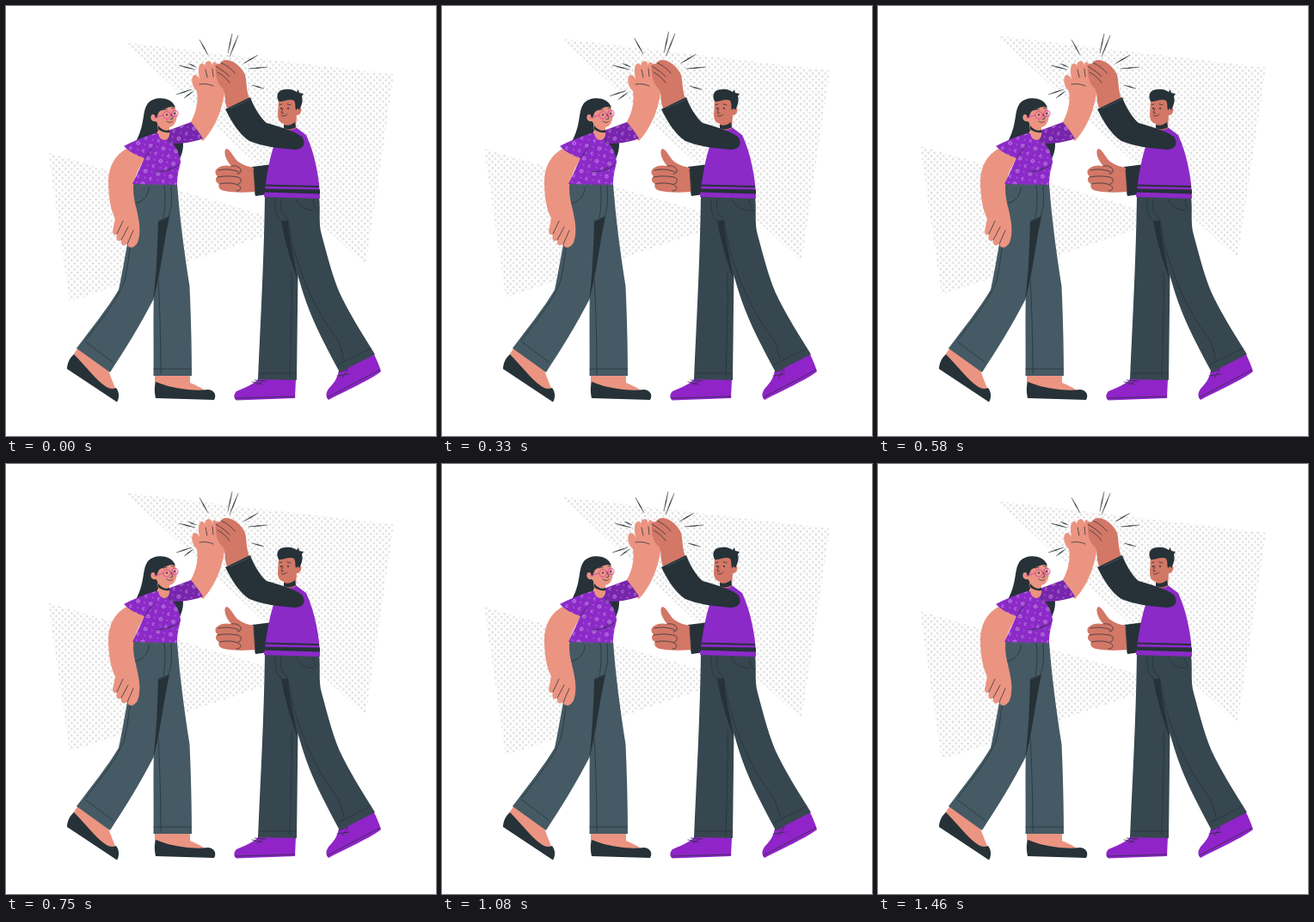
An HTML page for the animation above (1500 ms loop, 500 by 500 pixels).

```html
<!DOCTYPE html>
<html lang="en">
<head>
<meta charset="utf-8">
<title>High five</title>
<style>
  html, body { margin: 0; width: 100%; height: 100%; overflow: hidden; background: #fff; }
  svg { display: block; width: 100%; height: 100%; }
  .ink { fill: #263238; }
  .purple { fill: #8c2ac8; }
  .shade { fill: #7825ad; }
  .shoe { fill: #9024c8; }
  .skin { fill: #eb9481; }
  .tan { fill: #d37766; }
  .jeans { fill: #455a64; }
  .slacks { fill: #37474f; }
  .line { fill: none; stroke: #263238; stroke-width: .75; stroke-linecap: round; stroke-linejoin: round; }
  .pink { fill: none; stroke: #d63bb8; stroke-width: .85; }
</style>
</head>
<body>
<svg viewBox="0 0 500 500">
  <defs>
    <pattern id="dots" width="7.1" height="7.1" patternUnits="userSpaceOnUse">
      <g fill="#e0e0e0">
        <circle cx="1.775" cy="1.775" r="1.45"/>
        <circle cx="5.325" cy="5.325" r="1.45"/>
      </g>
    </pattern>
    <pattern id="print" width="15" height="15" patternUnits="userSpaceOnUse" patternTransform="rotate(12)">
      <g fill="none" stroke="#dfb5f3" stroke-width=".8">
        <circle cx="3.5" cy="4" r="1.7"/>
        <path d="M12.4 10.3A1.4 1.4 0 1 0 12.4 12.6"/>
        <path d="M10.5 3.5l1.2 .6M4 11l.8 1.2"/>
      </g>
    </pattern>
  </defs>

  <g id="backdrop" fill="url(#dots)">
    <path d="M139 43L451 80L418 302Z"/>
    <path d="M49 171L312 247V264L74 344Z"/>
  </g>

  <g id="sparks" class="ink"></g>

  <g id="woman">
    <path class="ink" d="M192 155L205 154C207 162 206 170 201 180Z"/>
    <path class="ink" d="M196 116C192 106 173 104 165 113C159 121 161 132 156 146C153 155 149 160 149 165C160 163 171 156 176 147L186 128Z"/>

    <path class="skin" d="M84 397L119 424L128 447L105 440L78 406Z"/>
    <path class="ink" d="M79 405C74 409 71 416 71 422L129 460.500C132 456 132 449 128 444C124 446 119 445 114 441C104 434 92 418 79 405Z"/>
    <path class="skin" d="M173 428H214V438C221 441 228 444 232 448L190 448L173 439Z"/>
    <path class="ink" d="M174 437C172 444 173 451 174 456L242 458C245 453 243 447 235 446C226 447 216 447 204 445C190 443 182 440 174 437Z"/>

    <path class="jeans" d="M165 207L199 207C202 246 207 284 213.500 326C215 360 216 397 216 430H171.500C172 400 171 365 172 330L177 248Z"/>
    <path class="jeans" d="M148 207H198L191 245C183 275 181 308 171 342C156 371 138 400 121 426L82 398C99 375 118 352 131 330C136 307 139 286 144 262C147 243 147 225 148 207Z"/>
    <path class="ink" d="M177 251L190 245C183 276 180 310 171 343C175 313 176 282 177 251Z"/>
    <path class="line" d="M92 390L124 414M93 388C112 363 130 342 138 319C143 299 143 281 147 265M172 422H215M177 318C179 352 180 390 180 428M166 211C166 221 159 228 149 230M184 209C186 222 185 236 183 246M192 209C193 224 193 235 189 244M177 250L190 245"/>

    <path class="skin" d="M140 166C127 173 119 187 119 204C119 222 122 238 127 247L124 262C124 266 127 267 129 265C127 272 130 275 134 272C133 279 138 280 141 276C142 284 150 281 153 275C156 267 156 257 154 247C152 234 148 226 148 211C149 198 155 187 162 177Z"/>
    <path class="line" d="M136 250L129 265M142 257L134 272M148 261L141 277"/>

    <path class="skin" d="M211 141C221 127 224 112 222 99C216 94 214 83 219 80C223 80 225 84 226 87C223 79 223 69 227 67C230 66 232 70 232 74C230 68 232 64 236 64C239 64 240 68 240 73C239 66 241 64 244 66C248 68 250 78 252 85C256 94 254 107 250 119C245 136 237 148 229 157Z"/>
    <path class="line" d="M225 91C231 90 237 91 241 93M232 74L234 83M240 73L241 82M246 72L247 80"/>

    <g id="shirt">
      <path class="purple" d="M174 148C163 151 148 157 137 163C144 170 152 174 161 177L147 207L199 208C199 195 202 188 203 181C202 172 198 164 192 157L192 145Z"/>
      <path class="shade" d="M188 145L215 135C220 141 225 147 229 154C217 159 203 160 191 160Z"/>
      <path fill="url(#print)" d="M174 148C163 151 148 157 137 163C144 170 152 174 161 177L147 207L199 208C199 195 202 188 203 181C202 172 198 164 194 159L229 154L215 135L190 145Z"/>
      <path class="line" d="M161 177C165 172 168 166 172 162M189 147C188 153 189 157 192 160M202 183C197 190 186 192 175 193M193 187L189 190"/>
    </g>

    <path class="skin" d="M176 136L190 136L190 145C191 152 188 156 184 156C179 155 177 151 177 147Z"/>
    <path class="ink" d="M177 139C181 144 186 146 190 144L190 147C184 148 179 145 177 143Z"/>
    <path class="skin" d="M174 121C181 119 188 116 194 115C199 121 200 129 197 135C194 143 183 143 178 138L174 134C170 135 167 131 169 127C170 125 173 126 174 128Z"/>
    <path class="ink" d="M173 128C172 118 178 114 185 112C190 111 195 113 197 118C190 116 187 119 182 121C177 122 177 125 175 131Z"/>
    <g class="pink">
      <circle cx="187" cy="127" r="4.300"/>
      <circle cx="196.500" cy="125" r="3.700"/>
      <path d="M183 127L172 130M191 126L193 126"/>
    </g>
    <path class="line" d="M183 121L187 120M193 119L196 119M192 126L194 131L191 132M187 134C190 136 192 136 194 134"/>
    <circle class="ink" cx="187" cy="126.500" r="1"/>
    <circle class="ink" cx="196" cy="125" r="1"/>
  </g>

  <g id="man">
    <path class="shoe" d="M268 448C277 444 288 440 293 434H337L336 456L268 458.500C264 456 265 451 268 448Z"/>
    <path class="shoe" d="M387 424L428 405C431 411 434 418 436 425C427 433 392 449 375 458C371 454 372 449 376 444C382 438 386 431 387 424Z"/>
    <path class="line" d="M267 456L336 454M374 455L435 423M286 437L298 440M289 435L303 436M292 441L299 436M385 430L399 428M387 426L398 422M391 432L397 424"/>

    <path class="slacks" d="M301 222H335L339.500 310L338 435L293 434C296 365 300 295 301 222Z"/>
    <path class="slacks" d="M315 222H364C366 237 363 252 367 266C374 292 381 320 391 340C402 362 416 384 429 405L388 426C373 398 358 370 349 344C345 333 342 322 339 312C334 292 325 268 320 248Z"/>
    <path class="ink" d="M320 250L328 249C329 272 336 295 339 318C331 297 324 273 320 250Z"/>
    <path class="line" d="M295 427H336M332 310C333 350 331 390 330 432M386 417L424 398M328 251C334 290 351 344 387 390L393 410M313 224C312 238 315 247 321 250M320 224C318 235 320 243 328 248M337 224C341 234 348 238 358 237M357 226C358 231 359 235 362 238"/>

    <path class="ink" d="M286 187L310 184L304 219L290 221Z"/>
    <path class="tan" d="M288 188L290 216C276 217 264 217 254 215C248 214 246 210 248 207C243 205 243 200 246 198C242 195 243 190 247 188C251 185 257 185 262 186C256 180 252 169 256 166C261 166 264 176 270 181C276 185 282 187 288 188Z"/>
    <path class="line" d="M262 186C267 185 271 187 273 190C274 193 272 195 269 195M247 191C255 189 264 190 271 193M246 199C255 197 264 198 270 199C275 201 274 206 270 207M248 207C256 205 265 206 270 208C275 211 273 215 268 215M288 190L290 219"/>

    <path class="purple" d="M325 140C318 147 313 157 310 167C305 184 302 204 300 222L365 224C365 202 359 171 349 150L337 141Z"/>
    <path class="ink" d="M302 207.500L364 209V211L301 209.500ZM301 212.500L365 213.500V218.500L300 216.500Z"/>

    <path class="tan" d="M257 119C253 109 256 101 252 96C245 91 243 77 244 69C247 66 249 68 250 66C252 62 257 62 262 64C269 67 275 73 278 80C280 88 279 97 283 108Z"/>
    <path class="line" d="M244 70C251 74 256 78 260 82M246 77C252 80 256 84 260 89M250 66C257 69 262 73 266 78"/>
    <path class="ink" d="M255 120L284 106C288 117 295 129 303 136C317 140 335 145 344 152C349 159 347 166 337 167C319 166 297 163 283 157C270 148 262 134 255 120Z"/>
    <path class="line" d="M261 119L285 108" style="stroke:#455a64"/>

    <path class="tan" d="M323 132L338 128L337 142C333 145 326 145 323 141Z"/>
    <path class="ink" d="M323 138C328 140 332 138 336 135L337 141C332 144 327 144 323 142Z"/>
    <path class="tan" d="M317 109L336 108L338 119C341 116 345 119 343 123C342 127 339 127 338 127C336 135 330 138 324 137C318 136 316 132 316 126Z"/>
    <path class="ink" d="M317 111C313 103 317 97 325 97C331 96 335 98 338 100L340 97L341 101L346 102L344 105C346 111 343 117 341 121C339 117 338 121 337 121C336 117 337 113 335 110C329 107 323 112 317 111Z"/>
    <path class="line" d="M318 115L321 114M327 114L331 115M322 119L320 124L323 125M320 127C322 129 325 128 327 126"/>
    <circle class="ink" cx="320" cy="119" r="1"/>
    <circle class="ink" cx="328" cy="119" r="1"/>
  </g>
</svg>
<script>
const LOOP = 1500;
const backdrop = document.getElementById('backdrop');
const sparks = document.getElementById('sparks');

// Each spark is a sliver from its outer tip to its inner tip.
const rays = [
  [225, 39, 235, 57], [263, 32, 258, 55], [270, 34, 260, 59],
  [293, 57, 276, 67], [304, 71, 282, 73], [300, 96, 286, 92],
  [201, 69, 220, 74], [212, 67, 221, 71], [198, 103, 216, 97], [207, 107, 218, 99]
];

function sliver([x1, y1, x2, y2]) {
  const length = Math.hypot(x2 - x1, y2 - y1);
  const dx = (y1 - y2) / length * .5, dy = (x2 - x1) / length * .5;
  const mx = (x1 + x2) / 2, my = (y1 + y2) / 2;
  return `M${x1} ${y1}L${mx + dx} ${my + dy}L${x2} ${y2}L${mx - dx} ${my - dy}Z`;
}

const ray = document.createElementNS('http://www.w3.org/2000/svg', 'path');
ray.setAttribute('d', rays.map(sliver).join(''));
ray.setAttribute('stroke', '#263238');
ray.setAttribute('stroke-width', '.3');
sparks.append(ray);

// Linear rise and fall: 1 at the peak, 0 at a distance of half.
const triangle = (t, peak, half) => Math.max(0, 1 - Math.abs(t - peak) / half);

function draw() {
  const t = performance.now() % LOOP;
  const rise = 10 * (1 - Math.abs(t - 705) / 750);
  const scale = 1 + .06 * triangle(t, 310, 270);
  backdrop.setAttribute('transform', `translate(0 ${-rise})`);
  sparks.setAttribute('transform', `translate(251 72) scale(${scale}) translate(-251 -72)`);
  requestAnimationFrame(draw);
}
draw();
</script>
</body>
</html>
```
